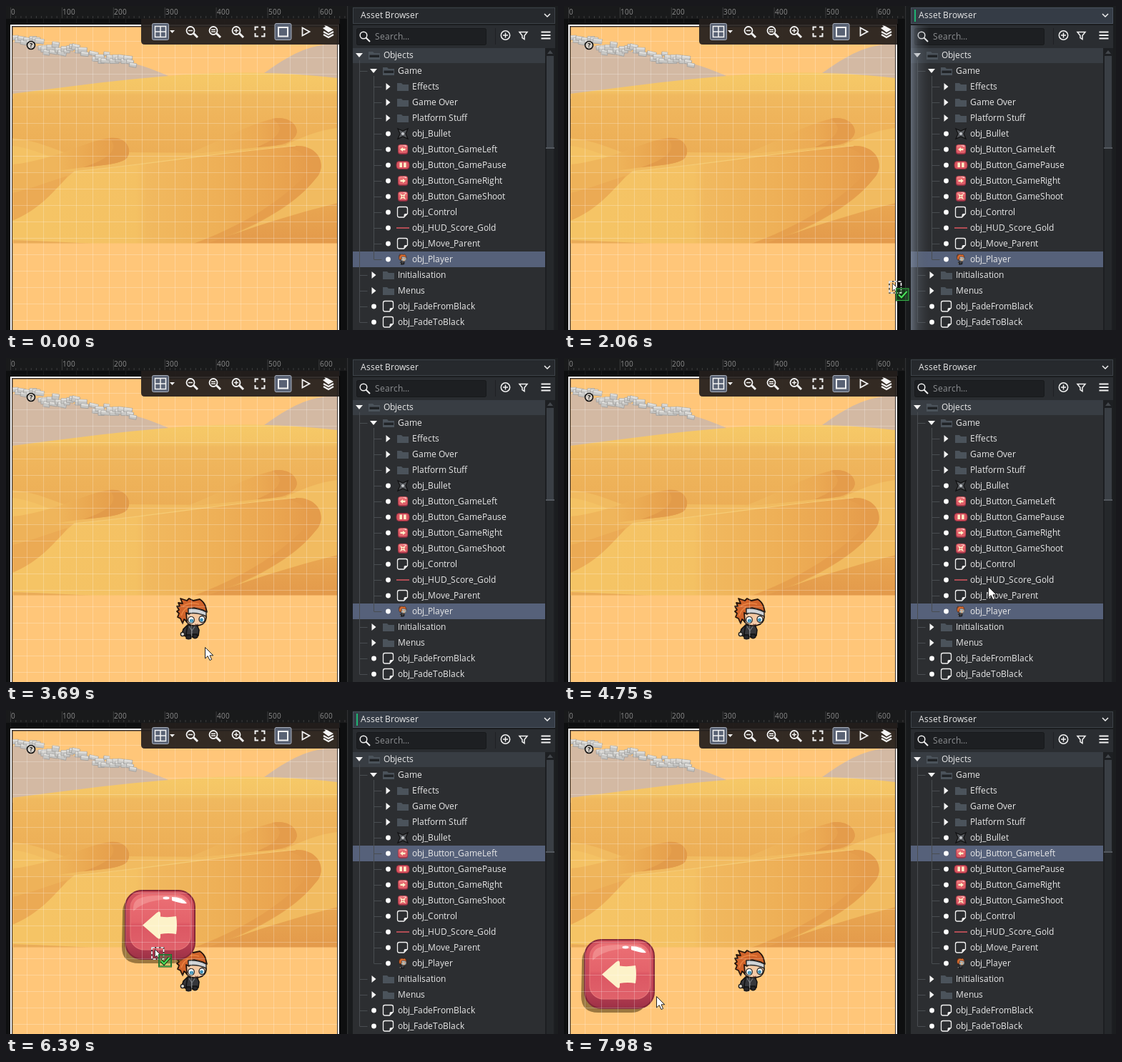
Write an HTML page that moves like this. It is 772 px wide and 454 px high and loops after 8 s.

```html
<!DOCTYPE html>
<html lang="en">
<head>
<meta charset="utf-8">
<title>Room editor</title>
<style>
html, body { margin: 0; width: 100%; height: 100%; overflow: hidden; background: #0f1011; }
svg { display: block; width: 772px; height: 454px; }
text { font-family: "Open Sans", "Noto Sans", sans-serif; font-size: 12px; fill: #e8e8e8; white-space: pre; }
.ruler { font-size: 10px; fill: #8c8c8c; }
.line { fill: none; stroke: #f2f2f2; stroke-width: 1.5; }
</style>
</head>
<body>
<svg id="stage" viewBox="0 0 772 454" xmlns="http://www.w3.org/2000/svg"></svg>
<script>
const LOOP = 8000, CELL = 23, ROOM_X = 6, ROOM_Y = 26;

const rect = (x, y, w, h, fill, more = '') =>
  `<rect x="${x}" y="${y}" width="${w}" height="${h}" fill="${fill}" ${more}/>`;
const path = (d, fill, more = '') => `<path d="${d}" fill="${fill}" ${more}/>`;
const line = (d, more = '') => `<path d="${d}" class="line" ${more}/>`;
const group = (id, body, more = '') => `<g id="${id}" ${more}>${body}</g>`;
const grad = (id, horizontal, from, to, stops) =>
  `<linearGradient id="${id}" gradientUnits="userSpaceOnUse" ` +
  (horizontal ? `x1="${from}" x2="${to}" y1="0" y2="0">` : `x1="0" x2="0" y1="${from}" y2="${to}">`) +
  stops.map(([o, c, a = 1]) => `<stop offset="${o}" stop-color="${c}" stop-opacity="${a}"/>`).join('') +
  '</linearGradient>';
const range = (n, fn) => Array.from({ length: n }, (_, i) => fn(i)).join('');

// Glyphs advance by whole pixels, as in a hinted interface font.
const pen = document.createElement('canvas').getContext('2d');
function label(x, y, s, more = '', size = 12) {
  pen.font = `${size}px "Open Sans", "Noto Sans", sans-serif`;
  let at = Math.round(x);
  const xs = [...String(s)].map(c => {
    const here = at;
    at += Math.round(pen.measureText(c).width);
    return here;
  });
  return `<text x="${xs.join(' ')}" y="${y}" ${more}>${s}</text>`;
}

let seed = 11;
const rnd = () => (seed = seed * 16807 % 2147483647) / 2147483647;

function defs() {
  const hero =
    path('M15 39L10 44L8 51L13 54L17 50L18 45Z', '#37373b', 'stroke="#121212" stroke-width="1.6"') +
    path('M16 38H29L32 45L31 53L26 55H15L14 50Z', '#36373b', 'stroke="#121212" stroke-width="1.6"') +
    path('M18 40L22 46L27 39M22 46V53', 'none', 'stroke="#777b80" stroke-width="1.2"') +
    path('M14 52h6l1 5q-4 2-7 0zM23 51h6l1 4q-3 3-6 1z', '#26262a', 'stroke="#111" stroke-width="1.3"') +
    '<circle cx="9" cy="51" r="2.7" fill="#d9d5cc" stroke="#1a1a1a" stroke-width="1.3"/>' +
    path('M12 24Q12 38 25 39Q41 40 42 27L40 18L14 16Z', '#f3c8a2', 'stroke="#1b1310" stroke-width="1.7"') +
    path('M1 12L5 12L3 7L9 8L6 1L15 4L18 1L24 4L33 2Q39 6 41 12L43 20L37 17L25 14L17 16L18 23L14 21L15 33L11 30L9 36L6 29L2 27L4 22L1 19L4 17Z',
      '#d0632a', 'stroke="#24140c" stroke-width="1.8" stroke-linejoin="round"') +
    path('M9 12Q20 5 32 9M7 25Q10 16 17 13', 'none', 'stroke="#e98240" stroke-width="1.8"') +
    path('M17 15Q30 14 42 20L42 26Q30 20 17 22Z', '#cfd3d7', 'stroke="#2b2b2b" stroke-width="1.4"') +
    '<ellipse cx="21" cy="31" rx="4.3" ry="4.6" fill="#fff" stroke="#222" stroke-width="1.3"/>' +
    '<ellipse cx="36" cy="30" rx="4" ry="4.5" fill="#fff" stroke="#222" stroke-width="1.3"/>' +
    '<circle cx="21.5" cy="32" r="2.6" fill="#3b8fb5"/><circle cx="35.5" cy="31" r="2.4" fill="#3b8fb5"/>' +
    path('M26 37q3 1 5 0', 'none', 'stroke="#7b4936"');
  const plate =
    rect(5, 1, 97, 96, 'url(#plate)', 'rx="23" stroke="#852838" stroke-width="2"') +
    rect(12, 6, 84, 78, 'url(#face)', 'rx="19" stroke="#e67476" stroke-width="1.2"') +
    path('M20 15Q28 8 52 8H72Q86 8 92 18Q70 11 48 15Q28 18 16 30Q15 20 20 15Z', '#f6a3a0', 'opacity=".55"') +
    path('M70 10Q85 10 91 19Q84 20 70 15Z', '#fff') +
    '<ellipse cx="62" cy="11.5" rx="4.5" ry="1.9" fill="#fff"/>';
  const arrow = path('M29 49.5L49 32Q54 28 54 34V37.5Q65 39 76 37Q78 49 76 62Q65 60 54 62V66Q54 71 49 67Z', '#fdf2c9');
  return '<defs>' +
    grad('back', false, 94, 205, [[0, '#f6c967'], [.22, '#f4c465'], [.28, '#f0b95f'], [.55, '#efb45b'], [1, '#ecae56']]) +
    grad('ridgeL', true, 70, 172, [[0, '#efb55b'], [.45, '#eaa851'], [1, '#e39a49']]) +
    grad('ridgeR', true, 265, 407, [[0, '#efb75d'], [.6, '#ecab54'], [1, '#e39949']]) +
    grad('big', true, 60, 440, [[0, '#f5c465'], [.32, '#f4c163'], [.36, '#f1b95f'], [.62, '#eeb057'], [.84, '#eaa550'], [1, '#e3994a']]) +
    grad('low', false, 270, 332, [[0, '#eaa852'], [1, '#e39a4b']]) +
    grad('plate', false, 0, 98, [[0, '#d4535f'], [.7, '#bd4154'], [1, '#9c3046']]) +
    grad('face', false, 5, 85, [[0, '#ec7075'], [.5, '#e4636b'], [.55, '#dc5763'], [1, '#e0626b']]) +
    grad('glow', true, 485, 511, [[0, '#8591a3', .6], [.4, '#69737f', .3], [1, '#505861', 0]]) +
    '<clipPath id="room"><path d="M9.5 29.5H463V454H9.5Z"/></clipPath>' +
    group('hero', hero) + group('plateShape', plate) +
    group('leftButton', path('M1 34Q0 12 20 10L92 82Q90 103 70 103H24Q0 103 0 80Z', '#4a3812', 'opacity=".55"') + plate + arrow) +
    '</defs>';
}

function village() {
  const ridge = x => x < 50 ? 44 + (x - 10) * .2 : x < 112 ? 55 + (x - 50) * .06 : 66 + (x - 112) * .15;
  return range(42, i => {
    const x = 9 + i * 4;
    if (x > 106 && x < 117) return '';
    const w = 8 + rnd() * 5, h = 5 + rnd() * 3, y = ridge(x) - 6 + rnd() * 12;
    return `<g transform="translate(${x.toFixed(1)} ${y.toFixed(1)}) rotate(${(rnd() * 16 - 3).toFixed(1)})">` +
      rect(0, 0, w.toFixed(1), h.toFixed(1), '#c6c6c4', 'stroke="#9f9e9c" stroke-width=".8"') +
      rect(.5, 0, (w - 1).toFixed(1), 2.4, '#dfdedb') + '</g>';
  });
}

function scenery() {
  return rect(9, 29, 455, 425, '#ffc679') +
    path('M9 50C50 58 90 62 130 70C175 77 200 86 232 100L200 130H9Z', '#d3b9a3') +
    path('M358 96C382 80 404 62 440 55L464 52V104H358Z', '#d3b9a3') +
    village() +
    path('M9 123C80 114 160 103 228 98C300 91 390 92 464 101V332H9Z', 'url(#back)') +
    path('M9 185C45 188 70 203 92 208L172 205L270 206L464 188V332H9Z', '#f1bb60') +
    path('M9 196C40 200 60 212 92 222L9 232Z', '#f4c264') +
    path('M392 194C416 183 438 174 464 171V232H400Z', '#f2be62') +
    path('M250 208C295 193 338 165 374 158C397 153 412 170 405 182C397 195 362 196 322 201Z', 'url(#ridgeR)') +
    path('M372 158C397 153 412 170 405 182C397 195 378 196 350 198C382 186 393 170 372 158Z', '#e49c4b') +
    path('M9 222C70 216 112 188 146 185C170 182 178 204 168 214C156 224 112 224 74 231L9 236Z', 'url(#ridgeL)') +
    path('M144 185C170 182 178 204 168 214C158 222 136 223 108 226C146 214 160 199 144 185Z', '#e29b4a') +
    path('M9 236C40 232 70 231 95 232C75 260 50 285 9 301Z', '#eeb259') +
    path('M9 262C35 256 60 246 86 238C70 266 45 286 9 301Z', '#ebaa54') +
    path('M9 301C55 282 72 250 95 232C200 224 310 202 405 196C440 195 449 226 433 242C405 278 350 308 280 333H9Z', 'url(#big)') +
    path('M388 198C424 200 432 228 410 246C376 278 330 308 262 333H285C355 307 405 278 433 242C449 226 440 195 405 196Z', '#e59d4c', 'opacity=".8"') +
    path('M95 232C200 222 300 205 405 196', 'none', 'stroke="#f5cb75" stroke-width="1.2"') +
    path('M280 333C350 308 400 292 464 276V333Z', 'url(#low)') +
    path('M9 328Q70 330 120 333H9Z', '#eaac58') +
    rect(9, 332.5, 455, 122, '#ffc679');
}

function grid() {
  const d = range(21, i => `M${ROOM_X + i * CELL + .5} 29V454`) + range(19, i => `M9 ${ROOM_Y + i * CELL + .5}H464`);
  return path(d, 'none', 'stroke="#fff" stroke-width="1" opacity=".24"');
}

function toolbar() {
  const lens = (x, inner) => line(`M${x + 3.5} 38.5L${x + 9} 44`, 'style="stroke-width:3"') +
    `<circle cx="${x - 1}" cy="34.5" r="5.5" class="line" style="stroke-width:1.8"/>` + line(inner);
  const active = x => rect(x, 24.5, 23, 23, '#596274', 'rx="2" stroke="#a9b0bd"');
  return path('M189 18H466V54H194Q189 54 189 49Z', '#241f1c', 'opacity=".93"') +
    active(204.5) + line('M208.5 28.5H223.5V43.5H208.5ZM216 28.5V43.5M208.5 36H223.5') +
    path('M229 34h7l-3.5 4z', '#f2f2f2') +
    lens(259, 'M255 34.5h6') + lens(291, 'M287 33.2h6M287 36h6') + lens(323, 'M319 34.5h6M322 31.5v6') +
    line('M348.5 34V29.5H353M357 29.5H361.5V34M361.5 38V42.5H357M353 42.5H348.5V38', 'style="stroke-width:2"') +
    active(376) + line('M381 30H394V42.5H381Z', 'style="stroke-width:2"') +
    line('M414.5 30.5L424.5 36L414.5 41.5Z', 'style="stroke-width:1.8"') +
    path('M443 31L447 29L445 27L449 28L458 33L451 37Z', '#f5f5f5') +
    line('M444 36L451 40L458 36M444 40L451 44L458 40', 'style="stroke-width:2.2"');
}

function editor() {
  return rect(0, 0, 478, 454, '#0e0f10') +
    range(21, i => rect(ROOM_X + i * CELL, 18, 1, 454, '#1a1b1c')) +
    rect(0, 0, 478, 18, '#191a1b') +
    range(66, i => rect((ROOM_X + i * 7.19).toFixed(1), i % 10 ? 14 : 2, 1, i % 10 ? 3 : 15, '#3c3d3e')) +
    range(7, i => label(7.4 + i * 71.9, 12, i * 100, 'class="ruler"', 10)) +
    rect(5, 25, 462, 440, '#000') + rect(ROOM_X, ROOM_Y, 460, 440, '#fff') + rect(8, 28, 456, 440, '#3a3330') +
    `<g clip-path="url(#room)">${scenery()}` +
    '<use id="heroItem" href="#hero"/><use id="buttonItem" href="#leftButton"/>' + grid() + '</g>' +
    '<circle cx="35" cy="55" r="5.5" fill="#d8d2ca" stroke="#111" stroke-width="1.6"/>' +
    label(33, 58.4, '?', 'style="font-size:9px;font-weight:700;fill:#111"', 9) +
    toolbar() + rect(478, 0, 7, 454, '#191b1d') + rect(477, 0, 1.2, 454, '#303234');
}

const rowY = i => 69 + i * 22;
const folder = (x, y, open) => path(`M${x} ${y - 5}h6l2 2h8v9h-16z`, '#4b535b') +
  (open ? path(`M${x + 1.5} ${y - .5}h13.5v3.5h-13.5z`, '#202326') : '');
const chevron = (x, y, open) => path(open ? `M${x - 5} ${y - 3}h10l-5 6z` : `M${x - 2.5} ${y - 5}v10l6-5z`, '#f4f4f4');
const mini = (x, y, mark) => `<use href="#plateShape" transform="translate(${x - 7.5} ${y - 7}) scale(.142)"/>` + path(mark, '#fdf2c9');
const sheet = (x, y) => line(`M${x - 5} ${y - 7.5}h9q2.5 0 2.5 2.5v7l-5 5h-6.5q-2.5 0-2.5-2.5v-9.500q0-2.5 2.5-2.500z`, 'style="stroke-width:1.3"') +
  path(`M${x + 6.5} ${y + 2}l-5 5v-3q0-2 2-2z`, '#f2f2f2');

const icons = {
  star: (x, y) => path(`M${x - 7} ${y - 7}L${x} ${y - 4}L${x + 7} ${y - 7}L${x + 4} ${y}L${x + 7} ${y + 7}L${x} ${y + 4}L${x - 7} ${y + 7}L${x - 4} ${y}Z`,
    '#55585c', 'stroke="#0f0f10" stroke-width="1.2"') + `<circle cx="${x}" cy="${y}" r="2" fill="#c5c8cb"/>`,
  left: (x, y) => mini(x, y, `M${x - 4} ${y}l4-3v1.7h3.5v2.6h-3.5v1.7z`),
  right: (x, y) => mini(x, y, `M${x + 4} ${y}l-4-3v1.7h-3.5v2.6h3.5v1.7z`),
  pause: (x, y) => rect(x - 9, y - 5.5, 18, 11, '#d95561', 'rx="4" stroke="#8e2b3b"') +
    rect(x - 4.5, y - 3.5, 3.4, 6.5, '#fdf2c9') + rect(x + 1.2, y - 3.5, 3.4, 6.5, '#fdf2c9'),
  shoot: (x, y) => mini(x, y, `M${x - 4} ${y - 4}l4 2 4-2-2 4 2 4-4-2-4 2 2-4z`) + `<circle cx="${x}" cy="${y}" r="1" fill="#d95561"/>`,
  bar: (x, y) => rect(x - 9, y - .8, 18, 1.6, '#d0545c'),
  hero: (x, y) => `<use href="#hero" transform="translate(${x - 6} ${y - 7.5}) scale(.26)"/>`,
  sheet
};

// [indent, label, kind]
const rows = [
  [0, 'Objects', 'open'], [1, 'Game', 'open'], [2, 'Effects', 'shut'], [2, 'Game Over', 'shut'], [2, 'Platform Stuff', 'shut'],
  [2, 'obj_Bullet', 'star'], [2, 'obj_Button_GameLeft', 'left'], [2, 'obj_Button_GamePause', 'pause'],
  [2, 'obj_Button_GameRight', 'right'], [2, 'obj_Button_GameShoot', 'shoot'], [2, 'obj_Control', 'sheet'],
  [2, 'obj_HUD_Score_Gold', 'bar'], [2, 'obj_Move_Parent', 'sheet'], [2, 'obj_Player', 'hero'],
  [1, 'Initialisation', 'shut'], [1, 'Menus', 'shut'], [1, 'obj_FadeFromBlack', 'sheet'], [1, 'obj_FadeToBlack', 'sheet']
];

function tree() {
  const branches = 'M494.5 76V443M514.5 98V355' + rows.map(([n], i) =>
    n ? `M${474.5 + n * 20} ${rowY(i) + .5}h11` : '').join('');
  return rect(485, 59, 269, 395, '#2c2e31') + rect(485, 59, 269, 21, '#383d43') +
    rect(485, 0, 269, 22, '#56617a', 'id="selection"') +
    path(branches, 'none', 'stroke="#494d51"') +
    rows.map(([n, name, kind], i) => {
      const x = 494 + n * 20, y = rowY(i), dir = kind === 'open' || kind === 'shut';
      return (dir ? chevron(x, y, kind === 'open') + folder(x + 13, y, kind === 'open')
        : `<circle cx="${x + .5}" cy="${y}" r="3.4" fill="#fff"/>` + icons[kind](x + 21, y)) +
        label(x + 34, y + 4, name);
    }).join('');
}

function panel() {
  const titleChevron = line('M753 11l4 4 4-4');
  return rect(485, 0, 287, 454, '#1b1d1f') +
    rect(485.5, 2.5, 282, 22, '#26292d', 'stroke="#3d4349"') +
    rect(485, 27, 283, 32, '#2a2d31') + rect(490.5, 31.5, 181, 23, '#1d1f22', 'rx="2" stroke="#17191b"') +
    titleChevron +
    '<circle cx="500" cy="41" r="4.8" class="line"/>' + line('M503.5 44.5L509 50', 'style="stroke-width:2"') +
    label(516, 47, 'Search...', 'style="fill:#8d8f92"') +
    '<circle cx="698.5" cy="41" r="6.2" class="line"/>' + line('M695 41h7M698.5 37.5v7') +
    line('M718 36.5H729L725 41.5V46.5L722 44.5V41.5Z') + rect(684, 31, 1, 23, '#1f2124') +
    line('M748.5 36.5H761.5M748.5 41H761.5M748.5 45.5H761.5', 'style="stroke-width:2.2"') +
    tree() + rect(754, 59, 14, 395, '#1d1f22') +
    path('M757 67h8l-4-5z', '#44484d') + rect(756, 70, 10, 384, '#25282b') + rect(756, 70, 10, 129, '#3a3f45') +
    rect(755, 198, 12, 2, '#53585e') +
    rect(485, 27, 283, 427, 'url(#glow)', 'id="dock"') +
    group('focus', rect(485.5, 2.5, 282, 22, '#353c46', 'stroke="#4a535f"') +
      titleChevron + rect(490, 5, 2, 17, '#1fb574')) +
    label(496, 17, 'Asset Browser');
}

const POINTER = 'M0.5 .5V16L4.2 12.6L7 18.6L9.6 17.4L7 11.8H11.8Z';
function cursors() {
  const box = 'M1 1H17.5V17H1Z', tick = 'M14 19.5L18 23.5L25.5 15';
  return group('pointer', path(POINTER, '#fff', 'stroke="#222" stroke-width="1"')) +
    group('drag', path(box, 'none', 'stroke="#333" stroke-width="1.6"') +
      path(box, 'none', 'stroke="#fff" stroke-width="1.6" stroke-dasharray="4 2.2"') +
      `<g transform="translate(5 3) scale(.72)">${path(POINTER, '#fff', 'stroke="#222" stroke-width="1.2"')}</g>` +
      rect(11, 11, 17, 16.5, '#3fae4a', 'fill-opacity=".25" stroke="#123a18" stroke-width="2"') +
      rect(11, 11, 17, 16.5, 'none', 'stroke="#38b04a" stroke-width="1"') +
      path(tick, 'none', 'stroke="#0d2a10" stroke-width="4"') +
      path(tick, 'none', 'stroke="#4be25a" stroke-width="2.2"'));
}

document.getElementById('stage').innerHTML = defs() + editor() + panel() + cursors();
const $ = id => document.getElementById(id);

// [start ms, x, y], each held until the next
const pointerTrack = [
  [970, 626, 421], [1120, 597, 372], [1270, 597, 367], [1420, 596, 360], [1540, 596, 357], [1820],
  [3690, 278, 405], [3940, 289, 411], [4060, 308, 417], [4210, 420, 420], [4330, 533, 407], [4480, 561, 388],
  [4600, 582, 362], [4750, 593, 320], [4900, 594, 282], [5050, 595, 247], [5200, 595, 225], [5320, 594, 210],
  [5440, 593, 204], [6120], [7710, 88, 394], [7860, 106, 397], [7980, 129, 401]
];
const dragTrack = [
  [1820, 578, 360], [1940, 528, 374], [2060, 454, 385], [2180, 414, 391], [2330, 358, 395], [2450, 298, 398],
  [2600, 274, 402], [3690], [6120, 545, 255], [6240, 408, 338], [6390, 203, 332], [6510, 140, 372],
  [6630, 108, 396], [6780, 92, 394], [6900, 84, 391], [7710]
];
const heroTrack = [[2180, 399, 313], [2330, 330, 313], [2450, 284, 336], [2600, 238, 336]];
const buttonTrack = [[6390, 162, 252], [6510, 93, 298], [6630, 47, 321], [6780, 24, 321]];

const show = (id, on) => $(id).setAttribute('visibility', on ? 'visible' : 'hidden');

function place(id, track, t) {
  const at = track.filter(k => k[0] <= t).pop();
  const shown = at && at.length > 1;
  show(id, shown);
  if (shown) $(id).setAttribute('transform', `translate(${at[1]} ${at[2]})`);
}

function draw(t) {
  place('pointer', pointerTrack, t);
  place('drag', dragTrack, t);
  place('heroItem', heroTrack, t);
  place('buttonItem', buttonTrack, t);
  show('focus', t >= 1820 && t < 3690 || t >= 6120 && t < 7710);
  show('dock', t >= 1940 && t < 2180);
  $('selection').setAttribute('y', rowY(t < 6000 ? 13 : 6) - 11);
}

const start = performance.now();
function tick() {
  draw((performance.now() - start) % LOOP);
  requestAnimationFrame(tick);
}
tick();
</script>
</body>
</html>
```
